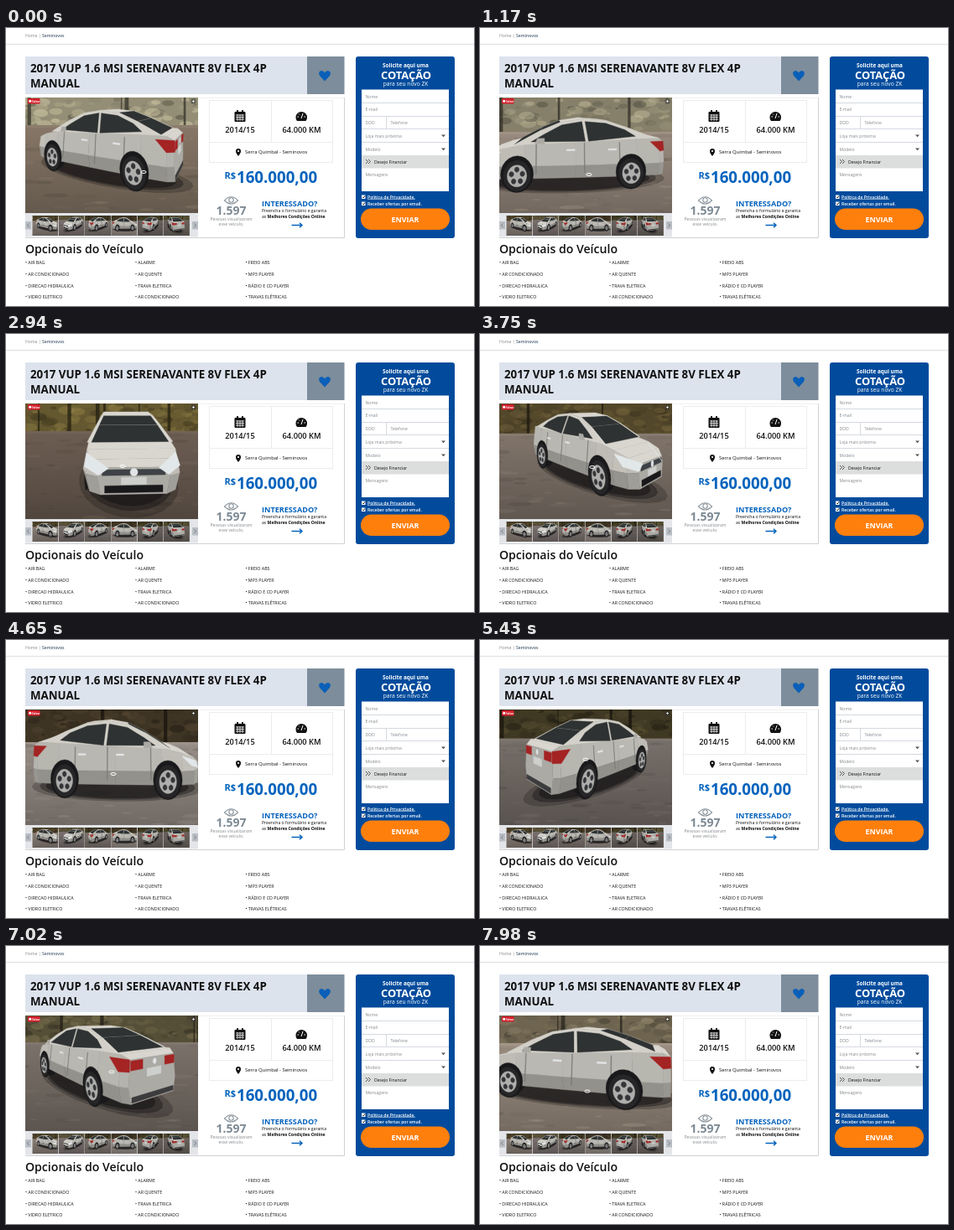
These frames come from a looping animation (558 px wide and 332 px high, 8 s). An HTML page with a canvas:

```html
<!DOCTYPE html>
<html lang="pt-BR">
<head>
<meta charset="utf-8">
<title>Seminovos</title>
<style>
  html, body { margin: 0; width: 558px; height: 332px; overflow: hidden; background: #fff; }
  svg, canvas { position: absolute; left: 0; top: 0; }
  text { font: 5.1px "Open Sans", sans-serif; fill: #111; white-space: pre; }
  .semi { font-weight: 600; }
  .bold { font-weight: 700; }
  .mid { text-anchor: middle; }
  .title { font-size: 13.3px; font-weight: 700; }
  .spec { font-size: 9.3px; font-weight: 600; text-anchor: middle; }
  .blue { fill: #0563bd; }
  .soft { fill: #85898d; }
  .white text { fill: #fff; }
  .list text { font-size: 5.3px; font-weight: 500; }
</style>
</head>
<body>
<svg width="558" height="332" viewBox="0 0 558 332">
  <path d="M0 19.5H558" stroke="#e2e5e9" stroke-width="1.4"/>
  <text x="23" y="11" class="soft">Home | <tspan class="semi" fill="#4d6275">Seminovos</tspan></text>

  <rect x="23" y="34" width="336" height="45" fill="#dde3ed"/>
  <rect x="359" y="34" width="44.500" height="45" fill="#7d8d9b"/>
  <path d="M380 63.500L374 57Q371.500 52 376 51Q379 51 380 53.500Q381 51 384 51Q388.500 52 386 57Z" fill="#0a5fb8"/>
  <text x="29" y="53" class="title">2017 VUP 1.6 MSI SERENAVANTE 8V FLEX 4P</text>
  <text x="29" y="71" class="title">MANUAL</text>

  <path d="M23 250.500H403.500V83" fill="none" stroke="#cfd1d3"/>
  <path d="M229 83.500H403" stroke="#f0f0f0"/>
  <g fill="none" stroke="#ececec">
    <rect x="242.500" y="86.500" width="147" height="74"/>
    <path d="M242 136.500H390M316.500 86V136"/>
  </g>

  <g fill="#111">
    <rect x="272.500" y="100" width="13" height="12" rx="1"/>
    <path d="M275 98h2v4h-2zM281 98h2v4h-2z"/>
    <path d="M274 104h10M274 106.500h10M274 109h10M276 103v8M279 103v8M282 103v8" stroke="#fff" stroke-width=".8"/>
    <path d="M347 111A6.800 6.800 0 1 1 357.500 111Z"/>
    <path d="M352 108L354 102M347.500 106h1.500M349 102.500l1 1M355.500 106h1.500" stroke="#fff"/>
    <path d="M277 153Q273.800 149 274 147A3 3 0 0 1 280 147Q280.200 149 277 153Z"/>
    <circle cx="277" cy="147" r="1.100" fill="#fff"/>
  </g>
  <text x="279" y="124.500" class="spec">2014/15</text>
  <text x="352.500" y="124.500" class="spec">64.000 KM</text>
  <text x="285" y="150.300" style="font-size:5.9px">Serra Quimbal - Seminovos</text>

  <text x="260.500" y="180" class="blue bold" style="font-size:11px">R$</text>
  <text x="275" y="185" class="blue bold" style="font-size:18.7px">160.000,00</text>

  <g fill="none" stroke="#8a949c" stroke-width="1.100">
    <path d="M260.500 206Q268.500 197.500 276.500 206Q268.500 214 260.500 206Z"/>
    <circle cx="268.500" cy="205.500" r="2.700"/>
  </g>
  <text x="268.500" y="222.700" class="mid bold" style="font-size:14px;fill:#7d8a94">1.597</text>
  <text x="268.500" y="230" class="mid soft">Pessoas visualizaram</text>
  <text x="268.500" y="236" class="mid soft">esse veículo.</text>

  <text x="305" y="213" class="blue bold" style="font-size:9.1px">INTERESSADO?</text>
  <text x="305" y="220">Preencha o formulário e garanta</text>
  <text x="305" y="226.500">as <tspan class="bold">Melhores Condições Online</tspan></text>
  <path d="M340.500 235.500H353M350 232.800L353 235.500L350 238.200" fill="none" stroke="#0563bd" stroke-width="1.400"/>

  <rect x="417" y="34" width="118" height="217" rx="3" fill="#024b9c"/>
  <g class="white">
    <text x="476.500" y="47" class="mid bold" style="font-size:6.4px">Solicite aqui uma</text>
    <text x="477" y="60.500" class="mid bold" style="font-size:12.9px">COTAÇÃO</text>
    <text x="476.500" y="69" class="mid" style="font-size:6.7px">para seu novo ZK</text>
    <text x="431" y="203.500" class="semi" style="text-decoration:underline">Política de Privacidade.</text>
    <text x="431" y="211.500" class="semi">Receber ofertas por email.</text>
    <rect x="423" y="215.500" width="106" height="25.500" rx="12.700" fill="#ff7f0d"/>
    <text x="476" y="231.700" class="mid bold" style="font-size:8.9px">ENVIAR</text>
  </g>
  <rect x="424" y="73.500" width="104" height="121.500" fill="#fff"/>
  <rect x="424" y="152" width="104" height="15.500" fill="#dcdddd"/>
  <path d="M424 89.500H528M424 105.500H528M424 120.500H528M424 136.500H528M453.500 105V120" stroke="#d5dae0"/>
  <text x="428.500" y="83.500" class="soft">Nome</text>
  <text x="428.500" y="99" class="soft">E-mail</text>
  <text x="428.500" y="115" class="soft">DDD</text>
  <text x="458.500" y="115" class="soft">Telefone</text>
  <text x="428.500" y="130.500" class="soft">Loja mais próxima</text>
  <text x="428.500" y="146.500" class="soft">Modelo</text>
  <text x="439" y="161.700">Desejo Financiar</text>
  <text x="428.500" y="177" class="soft">Mensagens</text>
  <path d="M519 127.500h5l-2.500 2.700zM519 143.500h5l-2.500 2.700z" fill="#555"/>
  <path d="M429 157l2.500 2.500l-2.500 2.500M432 157l2.500 2.500l-2.500 2.500" fill="none" stroke="#444" stroke-width=".9"/>
  <path d="M424 199.500h4.500v4.500h-4.500zM424 207.500h4.500v4.500h-4.500z" fill="#fff"/>
  <path d="M425 201.700l1.200 1.300l2-2.800M425 209.700l1.200 1.300l2-2.800" fill="none" stroke="#222" stroke-width=".9"/>

  <text x="23" y="269" style="font-size:14.1px;font-weight:600">Opcionais do Veículo</text>
  <g class="list" id="options"></g>

  <rect x="23" y="221" width="206" height="28.500" fill="#e3e5e9"/>
  <path d="M23 231h7v9.500h-7zM222 231h7v9.500h-7z" fill="#b9bec5"/>
  <path d="M27.500 233.500l-2 2.200l2 2.200M224.500 233.500l2 2.200l-2 2.200" fill="none" stroke="#666" stroke-width=".8"/>
</svg>
<canvas id="photos" width="558" height="332"></canvas>
<svg width="558" height="332" viewBox="0 0 558 332">
  <rect x="26" y="84" width="14.500" height="6.500" rx="1" fill="#d3202c"/>
  <circle cx="28.700" cy="87.200" r="1.500" fill="#fff"/>
  <text x="31" y="88.500" class="bold" style="font-size:3px;fill:#fff">Salvar</text>
  <rect x="220.500" y="84.500" width="6" height="6" rx="1.500" fill="#3338"/>
  <path d="M222 87.500h3M223.500 86v3" stroke="#fff" stroke-width=".7"/>
</svg>

<script>
const options = [
  ["AIR BAG", "AR CONDICIONADO", "DIRECAO HIDRAULICA", "VIDRO ELETRICO"],
  ["ALARME", "AR QUENTE", "TRAVA ELETRICA", "AR CONDICIONADO"],
  ["FREIO ABS", "MP3 PLAYER", "RÁDIO E CD PLAYER", "TRAVAS ELÉTRICAS"]
];
document.getElementById("options").innerHTML = options.map((column, c) =>
  column.map((label, r) =>
    `<text x="${[23, 154, 285.5][c]}" y="${282 + r * 13.8}">• ${label}</text>`).join("")).join("");

const ctx = document.getElementById("photos").getContext("2d");
const LOOP = 8000, STEP = 30;
const CAMERA = { distance: 6, height: 1.6 };

// time, turn in degrees, car box (left, right, top, bottom), horizon,
// foliage rgb, road rgb, pointer x and y
const KEYS = [
  [0,    60,  40, 211, 97, 192, 116, 148, 142, 118, 114, 101, 88, 164, 172],
  [1170, 95,  2,  219, 107, 194, 124, 134, 128, 106, 130, 118, 108, 130, 175],
  [1950, 127, 49, 221, 93, 180, 112, 80, 74, 58, 110, 104, 106, 58, 176],
  [2940, 183, 92, 207, 93, 192, 116, 100, 88, 48, 92, 80, 70, 139, 158],
  [4650, 268, 33, 229, 95, 188, 122, 62, 52, 36, 128, 120, 114, 128, 160],
  [6090, 357, 73, 176, 93, 186, 114, 64, 60, 34, 78, 73, 70, 124, 128],
  [8000, 434, 6,  228, 97, 193, 116, 110, 100, 80, 132, 121, 110, 128, 174]
];

function poseAt(time) {
  const next = Math.max(1, KEYS.findIndex(key => key[0] >= time));
  const a = KEYS[next - 1], b = KEYS[next];
  const f = (time - a[0]) / (b[0] - a[0]);
  const v = a.map((value, i) => value + (b[i] - value) * f);
  return { turn: v[1], box: v.slice(2, 6), horizon: v[6],
           back: v.slice(7, 10), road: v.slice(10, 13), pointer: v.slice(13) };
}

let seed = 7;
const random = () => (seed = seed * 16807 % 2147483647) / 2147483647;
const PANORAMA = 1224;
const scatter = count => Array.from({ length: count }, () =>
  ({ x: random() * PANORAMA, y: random(), size: random(), light: random() }));
const leaves = scatter(500), trunks = scatter(22), patches = scatter(420);

const rgb = (color, gain = 1, alpha = 1) =>
  `rgba(${color.map(c => Math.min(255, Math.round(c * gain)))},${alpha})`;

function ellipse(x, y, rx, ry, fill) {
  ctx.fillStyle = fill;
  ctx.beginPath();
  ctx.ellipse(x, y, rx, ry, 0, 0, 7);
  ctx.fill();
}

function drawStreet({ turn, horizon, back, road }) {
  const pan = x => ((x - turn * 3.4) % PANORAMA + PANORAMA) % PANORAMA - 20;
  const depth = horizon - 83;
  const ground = ctx.createLinearGradient(0, horizon, 0, 221);
  ground.addColorStop(0, rgb(road, 1.18));
  ground.addColorStop(1, rgb(road, .88));
  ctx.fillStyle = rgb(back);
  ctx.fillRect(23, 83, 206, 138);
  for (const leaf of leaves)
    ellipse(pan(leaf.x), 83 + leaf.y * depth, 2 + leaf.size * 8, 1 + leaf.size * 4,
      rgb(back, .45 + leaf.light * 1.1, .45));
  for (const trunk of trunks) {
    ctx.fillStyle = rgb(back, .4, .8);
    ctx.fillRect(pan(trunk.x), 83, 1 + trunk.size * 4, depth);
  }
  ctx.fillStyle = ground;
  ctx.fillRect(23, horizon, 206, 221 - horizon);
  ctx.fillStyle = rgb(road, 1.3, .5);
  ctx.fillRect(23, horizon, 206, 3);
  for (const patch of patches)
    ellipse(pan(patch.x), horizon + 4 + patch.y * (217 - horizon), 2 + patch.size * 14, .6 + patch.size * 2,
      rgb(road, .6 + patch.light * .8, .25));
}

// Car axes: x forward, y to its right, z up, in metres.
const SILVER = [204, 202, 195], GLASS = [46, 50, 50], DARK = [25, 25, 27];
const WHEELS = [1.36, -1.34];
const ring = ([x, w, top]) => [
  [x, -w * .91, .22], [x, -w, .5], [x, -w * .92, top],
  [x, w * .92, top], [x, w, .5], [x, w * .91, .22]
];
const rings = [
  [2.25, .58, .64], [2.08, .78, .74], [1.75, .86, .84], [1.2, .88, .94], [0, .89, .97],
  [-1.5, .88, 1.03], [-2.1, .82, 1.03], [-2.25, .72, .95]
].map(ring);
// Arc of the cabin from the foot of the windshield to the boot lid.
const arc = [[1.45, .92], [.85, 1.2], [.35, 1.38], [-.2, 1.45], [-.8, 1.41], [-1.35, 1.25], [-1.95, 1.04]];
const cabinPoint = (side, [x, z]) => [x, side * (.8 - (z - .97) * .46), z];
const disc = (x, y, z, r) => Array.from({ length: 24 }, (_, i) =>
  [x + r * Math.cos(i * Math.PI / 12), y, z + r * Math.sin(i * Math.PI / 12)]);
const plate = (x, y0, y1, z0, z1) => [[x, y0, z0], [x, y1, z0], [x, y1, z1], [x, y0, z1]];
const fitPoints = [...rings.flat(),
  ...[-1, 1].flatMap(side => arc.map(p => cabinPoint(side, p))),
  ...WHEELS.flatMap(x => [[x, -.85, 0], [x, .85, 0]])];

function drawCar({ turn, box: [left, right, top, bottom] }) {
  const s = Math.sin(turn * Math.PI / 180), c = Math.cos(turn * Math.PI / 180);
  const project = ([x, y, z]) => {
    const distance = CAMERA.distance + x * c + y * s;
    return [(y * c - x * s) / distance, (CAMERA.height - z) / distance];
  };
  const eye = [-c * CAMERA.distance, -s * CAMERA.distance, CAMERA.height];

  const flat = fitPoints.map(project);
  const xs = flat.map(p => p[0]), ys = flat.map(p => p[1]);
  const x0 = Math.min(...xs), y0 = Math.min(...ys);
  const sx = (right - left) / (Math.max(...xs) - x0);
  const sy = (bottom - top) / (Math.max(...ys) - y0);

  function fill(points, color) {
    ctx.beginPath();
    for (const p of points) {
      const [x, y] = project(p);
      ctx.lineTo(left + (x - x0) * sx, top + (y - y0) * sy);
    }
    ctx.closePath();
    ctx.fillStyle = ctx.strokeStyle = color;
    ctx.lineWidth = .4;
    ctx.fill();
    ctx.stroke();
  }

  // Fills a polygon only when its outer side faces the camera.
  function face(points, color, shaded) {
    const n = points.length, o = points[0];
    const [u, v] = [points[Math.floor(n / 3)], points[Math.floor(2 * n / 3)]].map(p => p.map((q, i) => q - o[i]));
    let normal = [u[1] * v[2] - u[2] * v[1], u[2] * v[0] - u[0] * v[2], u[0] * v[1] - u[1] * v[0]];
    const dot = (a, b) => a[0] * b[0] + a[1] * b[1] + a[2] * b[2];
    const sign = dot(normal, [o[0], o[1], o[2] - .6]) < 0 ? -1 : 1;
    const length = Math.hypot(...normal) * sign || 1;
    normal = normal.map(q => q / length);
    if (dot(normal, eye.map((e, i) => e - o[i])) <= 0) return;
    fill(points, rgb(color, shaded ? Math.min(1.06, .84 + .45 * normal[2]) : 1));
  }

  for (const [grow, alpha] of [[1.12, .25], [1.02, .4], [.94, .5]])
    fill(Array.from({ length: 32 }, (_, i) =>
      [2.3 * grow * Math.cos(i * Math.PI / 16), grow * Math.sin(i * Math.PI / 16), 0]), `rgba(18,17,18,${alpha})`);
  for (const x of WHEELS)
    for (const y of [-.84, -.74, -.64, .64, .74, .84]) fill(disc(x, y, .31, .31), rgb(DARK));

  for (let i = 0; i < rings.length - 1; i++)
    for (let j = 0; j < 5; j++)
      face([rings[i][j], rings[i][j + 1], rings[i + 1][j + 1], rings[i + 1][j]], SILVER, true);
  face(rings[0], SILVER, true);
  face(rings.at(-1), SILVER, true);

  face(plate(2.26, -.5, .5, .52, .61), [62, 66, 70]);
  face(plate(2.26, -.46, .46, .25, .36), DARK);
  face(plate(2.27, -.2, .2, .38, .49), [205, 207, 205]);
  face(disc(0, 0, 0, .06).map(([x, , z]) => [2.27, x, z + .57]), [225, 228, 230]);
  face(plate(-2.26, -.22, .22, .62, .76), [205, 207, 205]);
  face(disc(0, 0, 0, .05).map(([x, , z]) => [-2.27, x, z + .87]), [225, 228, 230]);
  face(plate(-2.26, -.64, .64, .24, .33), [60, 60, 62]);

  for (const side of [-1, 1]) {
    face([[2.25, side * .4, .63], [2.25, side * .56, .52], [2, side * .81, .6], [1.75, side * .8, .78]], [226, 231, 233]);
    face(plate(-2.26, side * .34, side * .67, .77, .93), [164, 35, 35]);
    face([[-2.26, side * .7, .75], [-2.1, side * .83, .75], [-1.85, side * .83, .96], [-2.25, side * .68, .95]], [164, 35, 35]);
    for (const x of [.92, -.22, -1.08])
      face([[x, side * .9, .34], [x + .015, side * .9, .34], [x + .015, side * .83, .95], [x, side * .83, .95]], [120, 121, 120]);
    for (const x of [.02, -.98])
      face([[x, side * .9, .8], [x + .2, side * .9, .8], [x + .2, side * .9, .83], [x, side * .9, .83]], [226, 229, 231]);
    for (const x of WHEELS) {
      face(disc(x, side * .89, .34, .37), DARK);
      face(disc(x, side * .9, .31, .31), [38, 38, 40]);
      face(disc(x, side * .91, .31, .22), [174, 174, 172]);
      for (let k = 0; k < 5; k++) {
        const a = k * Math.PI * .4 + .3;
        face(disc(x + .13 * Math.cos(a), side * .915, .31 + .13 * Math.sin(a), .052), [52, 53, 56]);
      }
    }
  }

  for (let i = 0; i < arc.length - 1; i++) {
    const strip = [cabinPoint(-1, arc[i]), cabinPoint(1, arc[i]), cabinPoint(1, arc[i + 1]), cabinPoint(-1, arc[i + 1])];
    face(strip, SILVER, true);
    if (i < 2 || i > 3) face(strip.map(([x, y, z]) => [x, y * .9, z]), GLASS);
  }
  for (const side of [-1, 1]) {
    const panel = outline => outline.map(p => cabinPoint(side, p));
    face(panel(arc), SILVER, true);
    face(panel([[1.05, .98], [.75, 1.13], [.32, 1.32], [-.18, 1.39], [-.24, .98]]), GLASS);
    face(panel([[-.32, .98], [-.26, 1.39], [-.78, 1.35], [-1.25, 1.21], [-1.5, 1.07]]), GLASS);
    face([[.95, side * .98, .96], [.73, side * .98, .96], [.73, side * .98, 1.07], [.89, side * .98, 1.07]], SILVER, true);
  }
}

function drawPhoto(time, x, y, width, height) {
  const pose = poseAt(time);
  ctx.save();
  ctx.translate(x, y);
  ctx.scale(width / 206, height / 138);
  ctx.translate(-23, -83);
  ctx.beginPath();
  ctx.rect(23, 83, 206, 138);
  ctx.clip();
  drawStreet(pose);
  drawCar(pose);
  ctx.restore();
  return pose;
}

[4100, 2250, 5300, 4700, 5700, 6600].forEach((time, i) => drawPhoto(time, 31.5 + i * 31.3, 224, 30.8, 24));

function frame(now) {
  const time = Math.floor(now % LOOP / STEP) * STEP;
  const [x, y] = drawPhoto(time, 23, 83, 206, 138).pointer;
  ctx.strokeStyle = "#fff";
  ctx.lineWidth = 1;
  ctx.beginPath();
  ctx.ellipse(x, y, 3.2, 1.5, 0, 0, 7);
  ctx.stroke();
  requestAnimationFrame(frame);
}
frame(0);
</script>
</body>
</html>
```
